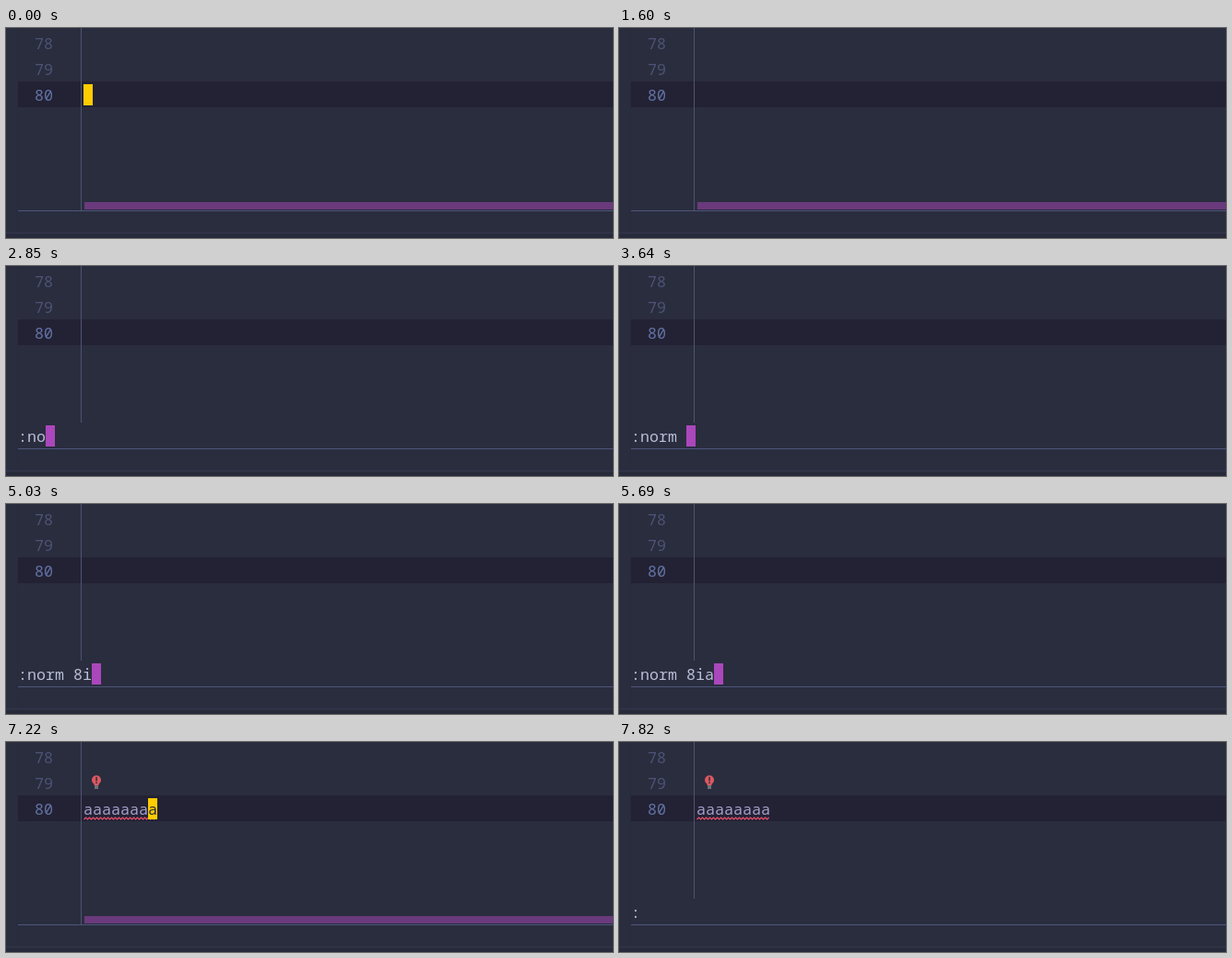
Animation of 658 by 228 pixels, one loop 8000 ms. Source, as an HTML page with a canvas:

```html
<!DOCTYPE html>
<html lang="en">
<head>
<meta charset="utf-8">
<title>Editor command line</title>
<style>
  html, body { margin: 0; width: 100%; height: 100%; overflow: hidden; background: #2a2d3e; }
  canvas { display: block; }
</style>
</head>
<body>
<canvas id="stage" width="658" height="228"></canvas>
<script>
const ctx = document.getElementById('stage').getContext('2d');
const LOOP = 8000, CELL = 10, LINE = 28, TEXT_X = 84;
const WORD = 'a'.repeat(8), WORD_END = TEXT_X + 7 * CELL;

// [start, command text or null, caret visible]
const steps = [
  [0, null, true],
  [600, null, false],
  [1060, null, true],
  [1600, null, false],
  [1990, ':', true],
  [2520, ':', false],
  [2650, ':n', true],
  [2850, ':no', true],
  [2980, ':nor', true],
  [3050, ':norm', true],
  [3580, ':norm', false],
  [3640, ':norm ', true],
  [4180, ':norm 8', true],
  [4700, ':norm 8', false],
  [5030, ':norm 8i', true],
  [5560, ':norm 8i', false],
  [5690, ':norm 8ia', true],
  [5890, null, true],
  [6890, null, false],
  [7220, null, true],
  [7350, ':', true],
  [7820, ':', false]
];
const INSERTED = 5890, UNDERLINED = 6220, BULB = 6750;

function rect(x, y, w, h, color) {
  ctx.fillStyle = color;
  ctx.fillRect(x, y, w, h);
}

function text(string, x, baseline, color) {
  ctx.fillStyle = color;
  ctx.fillText(string, x, baseline);
}

function drawFrame() {
  rect(0, 0, 658, 228, '#2a2d3e');
  rect(12, 0, 1, 222, '#282b3b');
  rect(13, 58, 645, LINE, '#232234');
  [78, 79, 80].forEach((n, i) =>
    text(String(n), 31, 23 + i * LINE, n === 80 ? '#6373a5' : '#4c5374'));
  rect(81, 0, 1, 198, '#4e546f');
  rect(13, 198, 645, 1, '#4e567b');
  rect(0, 222, 658, 1, '#34364d');
  rect(0, 224, 658, 4, '#272a3a');
}

function drawSquiggle() {
  ctx.strokeStyle = '#f0506c';
  ctx.lineWidth = 1.2;
  ctx.beginPath();
  for (let x = TEXT_X; x < WORD_END + CELL; x += 2) {
    ctx.lineTo(x + 0.5, (x - TEXT_X) % 4 ? 82 : 84);
  }
  ctx.stroke();
}

function drawBulb() {
  ctx.fillStyle = '#dc5860';
  ctx.beginPath();
  ctx.arc(98, 41.2, 5, 0, 2 * Math.PI);
  ctx.fill();
  rect(95.5, 44, 5, 3, '#dc5860');
  rect(97.3, 38, 1.5, 4.5, '#2a2d3e');
  rect(97.3, 43.5, 1.5, 1.5, '#2a2d3e');
  rect(96, 47.5, 4, 1, '#b4b2b0');
  rect(96, 49.5, 4, 1, '#b4b2b0');
}

function draw(time) {
  const [, command, caret] = steps.findLast(([start]) => start <= time);
  ctx.font = '16.6667px "Noto Sans Mono", monospace';
  drawFrame();

  if (time >= INSERTED) text(WORD, TEXT_X, 79, '#a29fcb');
  if (time >= UNDERLINED) drawSquiggle();
  if (time >= BULB) drawBulb();

  if (command === null) {
    rect(85, 189, 573, 8, '#6a3a7d');
    if (caret) {
      const inserted = time >= INSERTED;
      const x = inserted ? WORD_END : TEXT_X;
      rect(x, 61, CELL, 23, '#ffcc00');
      if (inserted) text('a', x, 79, '#2a2d3e');
    }
  } else {
    rect(13, 170, 645, 28, '#2a2d3e');
    text(command, 13, 191, '#b9bdd6');
    if (caret) rect(13 + command.length * CELL, 173, CELL, 23, '#ab47bc');
  }
}

const origin = performance.now();
function tick() {
  draw((performance.now() - origin) % LOOP);
  requestAnimationFrame(tick);
}
tick();
</script>
</body>
</html>
```
